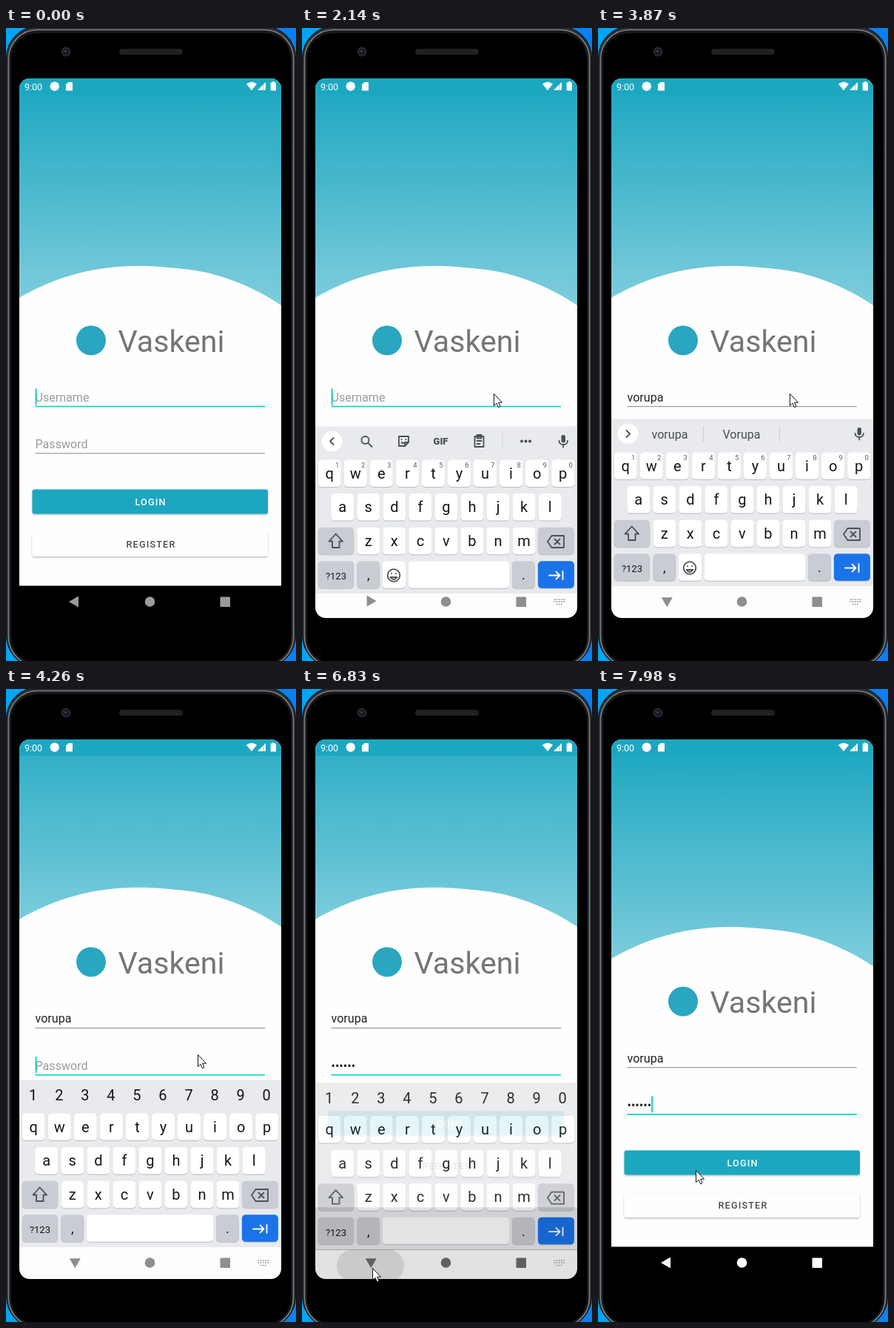
Write an HTML page that moves like this. It is 392x854 px and loops after 8000 ms.

```html
<!DOCTYPE html>
<html lang="en">
<head>
<meta charset="utf-8">
<title>Login screen</title>
<style>
  html, body { margin: 0; width: 100%; height: 100%; overflow: hidden; background: #0a98f5; }
  svg { display: block; width: 392px; height: 854px; font-family: Roboto, sans-serif; }
  .mid { text-anchor: middle; }
  .button { font-size: 12.6px; font-weight: 500; letter-spacing: 1.2px; }
  .field { font-size: 16.1px; }
  .key { font-size: 20px; fill: #151515; }
  .line { fill: none; stroke: #4c5055; stroke-width: 1.8; stroke-linejoin: round; stroke-linecap: round; }
</style>
</head>
<body>
<svg viewBox="0 0 392 854">
  <defs>
    <linearGradient id="blue" x2="1"><stop stop-color="#00a5f5"/><stop offset="1" stop-color="#0a7ff2"/></linearGradient>
    <linearGradient id="sky" gradientUnits="userSpaceOnUse" x1="0" y1="76" x2="0" y2="375">
      <stop stop-color="#1ca7c1"/><stop offset="1" stop-color="#7fcddc"/>
    </linearGradient>
    <clipPath id="screen"><rect x="18" y="68" width="354" height="728" rx="14"/></clipPath>
    <filter id="soft" x="-5%" y="-20%" width="110%" height="150%"><feDropShadow dx="0" dy="1.2" stdDeviation="1" flood-opacity=".3"/></filter>
  </defs>

  <rect width="392" height="854" fill="url(#blue)"/>
  <rect x=".5" y="-2" width="391" height="864" rx="42" fill="#2c2e30" stroke="#0c0d0e"/>
  <rect x="3.5" y="2.5" width="385" height="858" rx="39" fill="#17181a" stroke="#7b7f82" stroke-width="1.6"/>
  <rect x="7" y="7" width="378" height="850" rx="35"/>
  <circle cx="81" cy="32" r="6.5" fill="#25262b"/>
  <circle cx="81" cy="32" r="3.5" fill="#14161f"/>
  <circle cx="80.5" cy="31.5" r="1.3" fill="#41528a"/>
  <rect x="153" y="28" width="86" height="8" rx="4" fill="#202122"/>

  <g clip-path="url(#screen)">
    <g id="page">
      <path d="M18 68H372V752.5H18Z" fill="#fefefe"/>
      <path d="M18 68H372V374C326 344 283 330 244 325.500C220 323 200 321 178 321C117 321 64 337 18 364Z" fill="url(#sky)"/>
      <circle cx="115" cy="421.500" r="20" fill="#2aa6c0"/>
      <text x="151.500" y="437" font-size="41.200" fill="#757575">Vaskeni</text>
      <text id="userHint" class="field" x="39.500" y="503.500" fill="#9b9b9b">Username</text>
      <text id="passHint" class="field" x="39.500" y="567" fill="#9b9b9b">Password</text>
      <text id="user" class="field" x="39.500" y="503.500" fill="#222"></text>
      <text id="pass" class="field" x="39.500" y="567" fill="#222"></text>
      <path id="userLine" d="M39.500 510.700H350"/>
      <path id="passLine" d="M39.500 573.900H350"/>
      <rect id="caret" width="2" height="22" fill="#10d5c3"/>
      <rect x="35.500" y="622.500" width="318.500" height="33" rx="3" fill="#1ca7c1" filter="url(#soft)"/>
      <text class="mid button" x="195.500" y="644" fill="#fff">LOGIN</text>
      <rect x="35.500" y="680.500" width="318.500" height="32.500" rx="3" fill="#fefefe" filter="url(#soft)"/>
      <text class="mid button" x="196" y="701" fill="#4a4a4a">REGISTER</text>
    </g>

    <rect x="18" y="68" width="354" height="22" fill="#1ca7c1"/>
    <g fill="#fff">
      <text x="25" y="83.500" font-size="12.500">9:00</text>
      <circle cx="65.700" cy="78.700" r="6.200"/>
      <path d="M84.500 73H89Q90 73 90 74V83.500Q90 84.500 89 84.500H82Q81 84.500 81 83.500V76.500Z"/>
      <path d="M325 75.500Q332 70 339 75.500L332 84.300Z"/>
      <path d="M340 84L351 73V84Z" opacity=".45"/>
      <path d="M340 84L347.500 76.500V84ZM348.500 75.500L351 73V84H348.500Z"/>
      <path d="M359.800 72.300H362.800V73.600H365V84.500H357.600V73.600H359.800Z"/>
    </g>

    <g id="keyboard">
      <path d="M18 527.500H372V753H18Z" fill="#e8eaed"/>
      <path d="M18 753H372V810H18Z" fill="#fdfdfd"/>
      <rect id="ripple" x="47" y="753" width="91" height="43" rx="21" fill="#000" opacity=".1"/>
      <g id="chevron">
        <circle cx="40.500" cy="547.500" r="13.800" fill="#fff"/>
        <path id="chevronMark" class="line" d="M42.500 543L38 547.500L42.500 552"/>
      </g>
      <g id="tools" class="line">
        <circle cx="85.500" cy="546" r="5"/><path d="M89.500 550L94.500 555"/>
        <path d="M131 541H144V549L139 554H131ZM139 554V549H144M134.500 549Q137 551.500 139 549M134.500 545V545.200M140.500 545V545.200"/>
        <path d="M233.500 541H245.500V555H233.500ZM236.500 541V539H242.500V541V543.500H236.500ZM236.500 547H242.500M236.500 551H240.500"/>
        <path d="M271 537V557" stroke="#cbced2" stroke-width="1"/>
        <path d="M297 547.500H297.100M302.500 547.500H302.600M308 547.500H308.100" stroke-width="4"/>
        <text class="mid" x="187.500" y="552" font-size="13" font-weight="900" stroke="none" fill="#4c5055">GIF</text>
      </g>
      <g id="mic">
        <rect x="350.500" y="539" width="5.500" height="10.500" rx="2.700" fill="#4c5055"/>
        <path class="line" d="M347.500 547Q348 552 353.200 552T359 547M353.200 552V555.500"/>
      </g>
      <g id="words" class="field mid" fill="#4a4d51">
        <path d="M142.500 537V558M245.500 537V558" stroke="#cbced2"/>
        <text x="97" y="553.500"></text><text x="194" y="553.500"></text><text x="294" y="553.500"></text>
      </g>
      <g id="digits"></g>
      <g id="keys"></g>
      <path class="line" d="M45.700 672.500L55 682.500H50.500V691H41V682.500H36.500Z"/>
      <path class="line" d="M337.500 675H354V691H337.500L332 683ZM341.500 679.500L348.500 686.500M348.500 679.500L341.500 686.500"/>
      <path class="line" d="M334 728.500H348M343.500 723.500L348.500 728.500L343.500 733.500M352.500 723V734" style="stroke:#fff"/>
      <g id="smiley" class="line">
        <circle cx="124" cy="728.500" r="8.300"/>
        <path d="M119.500 731Q124 737 128.500 731ZM121 726V726.200M127 726V726.200"/>
      </g>
    </g>

    <g id="nav">
      <path id="back" d="M85 774L98 766.500V781.500Z"/>
      <circle cx="194.500" cy="774" r="6.800"/>
      <rect x="289.500" y="767.500" width="13.500" height="13.500" rx="1"/>
      <path id="hideIcon" d="M340.500 771H355M340.500 774H355M343.500 777.500H352" fill="none" stroke="#8e8e8e" stroke-width="1.700" stroke-dasharray="1.700 1.500"/>
    </g>
  </g>
  <path id="pointer" d="M.5 .5V16.500L4 13.200L6.500 18.800L9 17.700L6.600 12.200H11.500Z" fill="#fff" stroke="#111" stroke-linejoin="round"/>
</svg>

<script>
const LOOP = 8000, STEP = 120, BLINK = 490;
const NAME = 'vorupa';
const THIRD_WORDS = ['', '', 'vote', 'vortex', 'virus', 'group', ''];
// When each event of the story happens, in ms.
const OPEN = 1900, TYPE_NAME = 2750, SUGGEST = 2890, BLUR = 3870, FOCUS_PASS = 3990,
  TYPE_PASS = 4540, MASK_ALL = 6440, PRESS_BACK = 6710, CLOSE = 6830, CLOSED = 7070;

const $ = id => document.getElementById(id);
const visible = (node, on) => node.setAttribute('visibility', on ? 'visible' : 'hidden');
const show = (id, on) => visible($(id), on);
const set = (id, attrs) => { for (const k in attrs) $(id).setAttribute(k, attrs[k]); };
const clamp = (v, max) => Math.min(max, Math.max(0, v));

// The screen is refreshed every STEP ms; progress runs from 0 to 1 in that rhythm.
const progress = (t, start, steps) => clamp((Math.floor((t - start) / STEP) + 1) / steps, 1);
const lettersTyped = (t, start, count, pace) => clamp(Math.floor((t - start) / pace) + 1, count);

function add(parent, tag, attrs, text = '') {
  const node = document.createElementNS('http://www.w3.org/2000/svg', tag);
  for (const k in attrs) node.setAttribute(k, attrs[k]);
  node.textContent = text;
  return parent.appendChild(node);
}

const PITCH = 35.05, ROW = 45.6, LEFT = 21.7, TOP = 572.5, GREY = '#caccd3';

function addKey(column, row, width, fill, label = '', size = 20) {
  const x = LEFT + column * PITCH, y = TOP + row * ROW;
  const g = add($('keys'), 'g', {});
  add(g, 'rect', { x, y: y + 1, width, height: 36.5, rx: 5, fill: '#b9bcc1' });
  add(g, 'rect', { x, y, width, height: 36.5, rx: 5, fill });
  add(g, 'text', { class: 'key mid', x: x + width / 2, y: y + 25, style: `font-size:${size}px` }, label);
  return g;
}

['qwertyuiop', 'asdfghjkl', 'zxcvbnm'].forEach((letters, row) =>
  [...letters].forEach((c, i) => addKey(i + (10 - letters.length) / 2, row, 31, '#fff', c)));
const hints = add($('keys'), 'g', { class: 'mid', 'font-size': 9.5, fill: '#5a5d61' });
[...'1234567890'].forEach((d, i) => {
  const x = LEFT + i * PITCH;
  add(hints, 'text', { x: x + 26, y: 583 }, d);
  add($('digits'), 'text', { class: 'key mid', x: x + 15, y: 555 }, d);
});
addKey(0, 2, 48.5, GREY);
addKey(8.48, 2, 49, GREY);
addKey(0, 3, 48.5, GREY, '?123', 13);
addKey(1.5, 3, 31, GREY, ',', 18);
const wideSpace = addKey(2.48, 3, 171.5, '#fff');
const narrowSpace = add($('keys'), 'g', {});
narrowSpace.append(addKey(2.48, 3, 31.5, '#fff'), addKey(3.48, 3, 136.5, '#fff'));
addKey(7.48, 3, 31, GREY, '.', 18);
addKey(8.48, 3, 49, '#1a73e8');

// Strokes of the hand: quadratic curves with an ease-out of the given power.
const moves = [
  { start: 1260, steps: 3, power: 1, path: [[328, 517], [293, 505], [259, 493]] },
  { start: 5810, steps: 7, power: 3, path: [[259, 493], [150, 552], [95, 781]] },
  { start: 7320, steps: 6, power: 1.5, path: [[95, 781], [113, 720], [132, 649]] },
];

function drawPointer(t) {
  const move = moves.findLast(m => m.start <= t);
  show('pointer', move);
  if (!move) return;
  const s = 1 - (1 - progress(t, move.start, move.steps)) ** move.power;
  const [a, b, c] = move.path;
  const place = [0, 1].map(i => (1 - s) ** 2 * a[i] + 2 * s * (1 - s) * b[i] + s * s * c[i]);
  set('pointer', { transform: `translate(${place.map(Math.round).join(' ')})` });
}

function caretOn(t) {
  if (t >= BLUR && t < FOCUS_PASS) return false;
  const rested = t < TYPE_NAME ? t + 190 : t - 5030;
  return rested < 0 || Math.floor(rested / BLINK) % 2 === 0;
}

function drawField(id, text, focused) {
  $(id).textContent = text;
  show(id + 'Hint', !text);
  set(id + 'Line', { stroke: focused ? '#10d5c3' : '#858585', 'stroke-width': focused ? 1.7 : 1 });
}

function drawFields(t, typed, secret) {
  const count = lettersTyped(t, TYPE_PASS, NAME.length, 108);
  const masked = t >= MASK_ALL ? count : Math.max(0, count - 1);
  drawField('user', typed, t < BLUR);
  drawField('pass', '•'.repeat(masked) + NAME.slice(masked, count), secret);
  const active = $(secret ? 'pass' : 'user');
  const width = active.textContent ? active.getComputedTextLength() : 0;
  set('caret', { x: 39.5 + width, y: secret ? 549.5 : 486.5 });
  show('caret', caretOn(t));
  set('page', { transform: `translate(0 ${secret && t < CLOSED ? -53.3 : 0})` });
}

function drawKeyboard(t, typed, secret) {
  const open = progress(t, OPEN, 4), closing = progress(t, CLOSE, 3) ** 2;
  const suggesting = t >= SUGGEST && !secret;
  set('keyboard', {
    transform: `translate(0 ${40 * (1 - open) + 32 * closing})`,
    opacity: Math.min(1, 1.4 * open) * (1 - closing),
  });
  show('tools', !suggesting && !secret);
  show('words', suggesting);
  show('digits', secret);
  for (const id of ['chevron', 'mic', 'smiley']) show(id, !secret);
  visible(hints, !secret);
  visible(narrowSpace, !secret);
  visible(wideSpace, secret);
  set('chevronMark', { transform: suggesting ? 'rotate(180 40.5 547.5)' : '' });
  const words = [typed, typed.charAt(0).toUpperCase() + typed.slice(1), THIRD_WORDS[typed.length]];
  $('words').querySelectorAll('text').forEach((node, i) => { node.textContent = words[i]; });
  drawNav(t, open);
}

function drawNav(t, open) {
  const up = open > 0 && t < CLOSED, pressed = t >= PRESS_BACK;
  const [onLight, onDark] = pressed ? ['#606060', '#fff'] : ['#8e8e8e', '#9b9b9b'];
  const turns = up ? Math.floor(open * 3) : 0;
  set('back', { transform: `rotate(${turns * 90} 92.8 773.5)` });
  set('nav', { fill: up ? onLight : onDark });
  show('hideIcon', up);
  show('ripple', up && pressed);
}

function draw(t) {
  const secret = t >= FOCUS_PASS;
  const letters = lettersTyped(t, TYPE_NAME, 2, 135) + lettersTyped(t, 3330, 4, 135);
  const typed = NAME.slice(0, letters);
  drawFields(t, typed, secret);
  drawKeyboard(t, typed, secret);
  drawPointer(t);
}

function tick() {
  draw(performance.now() % LOOP);
  requestAnimationFrame(tick);
}
tick();
</script>
</body>
</html>
```
